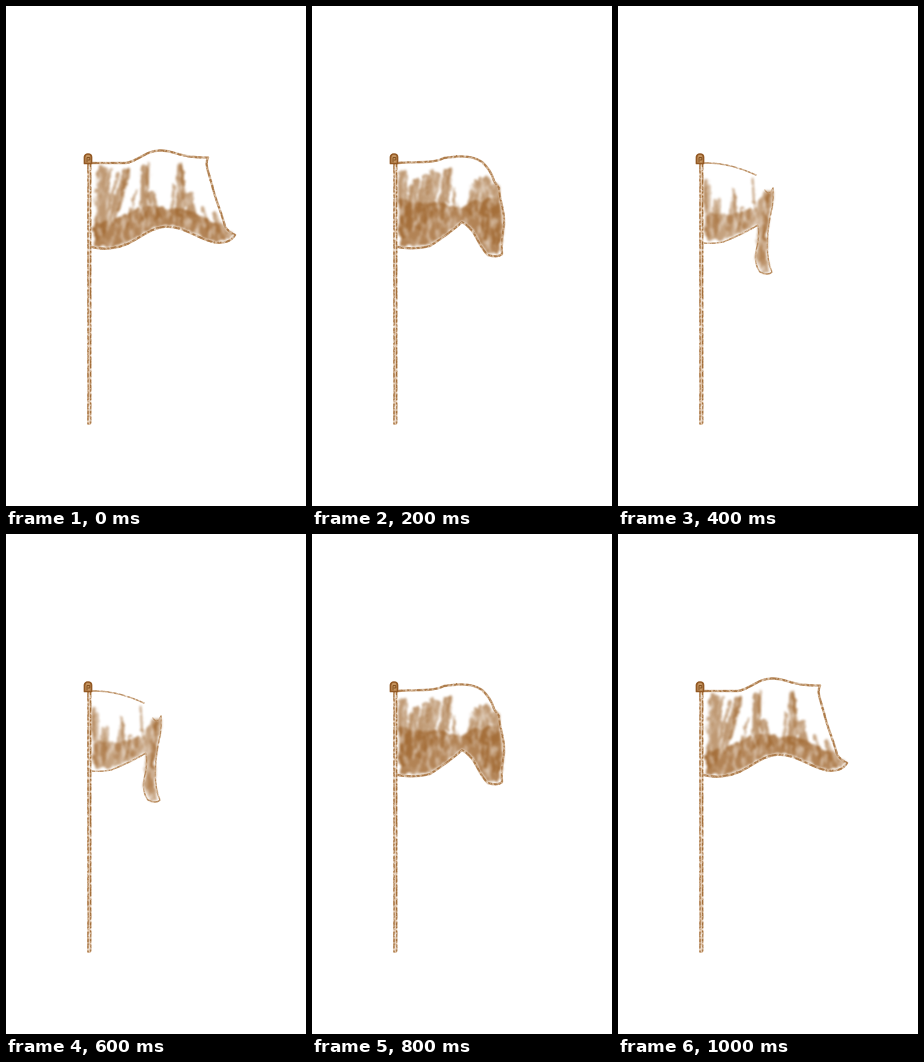
Animation, 300 px wide and 500 px high, one loop 1100 ms. Source, as an HTML page:

```html
<!DOCTYPE html>
<html lang="en">
<head>
<meta charset="utf-8">
<title>Waving flag</title>
<style>
  html, body { margin: 0; width: 100%; height: 100%; overflow: hidden; background: #fff; }
  svg { display: block; width: 100vw; height: 100vh; }
  path { fill: none; stroke-linecap: round; stroke-linejoin: round; }
  .hem { fill: #9f642b; opacity: .8; }
  .wide { stroke: #9f642b; stroke-width: 8; opacity: .66; }
  .thin { stroke: #9f642b; stroke-width: 3; opacity: .6; }
  .base { stroke: #cfac88; stroke-width: 2.5; }
  .grain { stroke: #a06a35; stroke-width: 1.8; stroke-linecap: butt; stroke-dasharray: 7 2 4 2.5 9 2; opacity: .75; }
  .faint .base { stroke-width: 1.5; }
  .faint .grain { stroke-width: 1.2; opacity: .5; }
  .faint .hem { opacity: .6; }
  .faint .wide { stroke-width: 5.5; opacity: .48; }
</style>
</head>
<body>
<svg viewBox="0 0 300 500">
  <defs>
    <filter id="brush" filterUnits="userSpaceOnUse" x="70" y="135" width="175" height="155" color-interpolation-filters="sRGB">
      <feTurbulence type="fractalNoise" baseFrequency=".2 .09" numOctaves="3" seed="4" result="noise"/>
      <feDisplacementMap in="SourceGraphic" in2="noise" scale="6" xChannelSelector="R" yChannelSelector="G" result="rough"/>
      <feColorMatrix in="noise" values="0 0 0 0 0  0 0 0 0 0  0 0 0 0 0  1.4 0 0 0 .22" result="mask"/>
      <feComposite in="rough" in2="mask" operator="in"/>
      <feGaussianBlur stdDeviation="1"/>
    </filter>
    <filter id="pencil" filterUnits="userSpaceOnUse" x="70" y="135" width="175" height="295" color-interpolation-filters="sRGB">
      <feTurbulence type="fractalNoise" baseFrequency=".35" numOctaves="2" seed="9" result="noise"/>
      <feDisplacementMap in="SourceGraphic" in2="noise" scale="1.4" xChannelSelector="R" yChannelSelector="G" result="rough"/>
      <feColorMatrix in="noise" values="0 0 0 0 0  0 0 0 0 0  0 0 0 0 0  1.8 0 0 0 0" result="mask"/>
      <feComposite in="rough" in2="mask" operator="in"/>
      <feGaussianBlur stdDeviation=".3"/>
    </filter>
  </defs>
  <g id="flag"></g>
  <g filter="url(#pencil)">
    <path d="M83.3 159V417" stroke="#e0c3a6" stroke-width="4"/>
    <path d="M82 158V418" stroke="#a06a35" stroke-width="1.3" stroke-dasharray="9 3 5 2"/>
    <path d="M84.7 158V418" stroke="#a06a35" stroke-width="1.3" stroke-dasharray="6 3 11 3"/>
  </g>
  <path d="M78.5 157.5V151Q79 148 82 148Q85.500 148 85.500 151V157.500Z" style="fill:#c4935f" stroke="#925823" stroke-width="1.7"/>
  <path d="M81 156V151.500H83.800V154H82" stroke="#82501f" stroke-width="1"/>
</svg>
<script>
const poses = [
  {
    line: "M86 157L120 157C133 155 140 144 155 144.500C172 145 171 152 202 151.500C198 160 204 168 207 183C212 201 217 210 219 221Q224 227 229 229Q224 238 209 236.500C191 233 181 221 160 220.500C139 222 128 240 108 241.500Q98 244 86 241",
    hem: "M88 219Q112 213 130 204Q142 196 162 203Q182 200 192 209L216 219L227 229Q220 236 207 235C191 231 178 219 160 219C138 221 124 240 105 241L88 240Z",
    wide: "M95 164L92 230M102 166L95 205M101 190L96 228M120 166L106 215M139 163L138 210M146 190L152 212M175 162L174 212M183 190L187 212",
    thin: "M112 167L103 204M123 163L113 203M130 184L122 220M142 157L141 190M176 157L179 200M168 180L165 212M197 202L203 224M209 208L213 224"
  },
  {
    line: "M86 157L119 157.500C133 156 141 144 154 144.500C166 145 169 152 175 155Q183 162 194 166L192 170C197 183 203 194 205 207Q207 224 216 234Q211 241 201 239.500C184 236 180 221 163 220.500C141 223 128 240 112 242Q99 244 86 241",
    hem: "M88 196Q112 204 126 196Q146 190 164 201L184 205L209 219L214 233Q208 239 200 238C184 234 179 219 163 219C140 221 125 240 110 241L88 240Z",
    wide: "M93 165L92 228M103 174L98 225M113 185L109 222M123 176L120 213M136 162L138 208M144 160L150 205M154 172L158 205M170 163L172 210M181 174L184 210",
    thin: "M99 163L95 195M117 166L113 202M131 164L128 200M164 168L165 205M176 167L178 205M186 177L187 212M199 207L204 225"
  },
  {
    line: "M86 157C104 155 121 158 132 152C150 149 162 150 170 156Q179 164 182 175L187 182C187 194 193 204 192 219Q189 234 190 248Q186 252 176 249C165 239 165 224 150 216C139 226 130 232 118 240Q103 244 86 241",
    hem: "M88 192Q110 200 127 196L148 202L160 196L188 190L191 221L188 247Q182 250 176 247C166 237 164 222 150 214C138 224 129 232 116 239L88 240Z",
    wide: "M91 167L91 228M104 176L97 220M114 172L106 220M124 170L116 215M135 166L128 210M164 178L161 207M175 174L173 230M183 181L185 235",
    thin: "M99 180L94 210M120 164L113 202M139 163L136 195M142 183L143 202M158 185L156 205M169 172L169 206"
  },
  {
    faint: true,
    line: "M86 157C105 154 128 157 145 160Q160 166 167 178L171 184C171 200 170 218 171 235Q173 249 171 259Q163 262 157 255C150 240 154 226 144 218C134 229 123 236 112 238Q98 241 86 239",
    hem: "M88 203Q111 208 128 203L148 200L155 185L169 184L169 220L171 257Q163 260 157 253C151 240 154 224 144 216C132 227 120 235 110 237L88 237Z",
    wide: "M91 173L91 228M103 182L98 222M116 179L110 220M129 172L125 212M159 186L160 238M166 188L165 250",
    thin: "M98 181L95 215M120 173L117 209M139 170L138 202M151 178L150 207"
  },
  {
    faint: true,
    line: "M86 157Q110 156 138 169M147 184Q151 191 155 182Q156 197 152 211C149 229 147 251 154 266Q150 270 142 266Q136 258 138 245Q142 231 140 219Q125 228 105 236Q95 238 86 237",
    hem: "M88 207L112 209L138 202L146 186L155 184Q155 200 151 215C148 234 148 251 152 266L144 267Q137 258 139 245L140 218Q121 228 104 234L88 234Z",
    wide: "M90 182L90 229M98 195L97 229M116 192L111 223M131 207L127 220M149 190L145 258",
    thin: "M88 175L88 205M101 192L101 218M116 184L118 215M135 173L137 205M124 202L121 222M151 188L147 235"
  },
  {
    faint: true,
    line: "M86 157Q105 157 126 172M132 188Q138 194 143 186Q144 205 140 223C136 245 137 261 142 276Q137 280 130 276Q124 265 127 248Q131 235 128 223Q115 231 101 235L86 237",
    hem: "M88 210L108 211L126 206L133 191L142 189Q142 211 138 225C135 245 136 261 140 275L132 276Q126 264 128 248L128 222Q113 230 100 234L88 235Z",
    wide: "M90 185L90 230M99 198L97 230M113 195L109 224M136 194L133 267",
    thin: "M88 178L88 205M105 193L104 218M116 185L118 213M124 178L125 206M139 192L135 240"
  }
];
const STEP = 100, LOOP = 1100;

const shape = (name, d) => `<path class="${name}" d="${d}"/>`;
const drawPose = p => `<g class="${p.faint ? "faint" : ""}" display="none">
  <g filter="url(#brush)">${["hem", "wide", "thin"].map(n => shape(n, p[n])).join("")}</g>
  <g filter="url(#pencil)">${shape("base", p.line)}${shape("grain", p.line)}</g></g>`;

const flag = document.getElementById("flag");
flag.innerHTML = poses.map(drawPose).join("");
const groups = [...flag.children];
let shown = -1;

// The flag sinks through all poses, then rises back the same way.
function render(time) {
  const step = Math.floor((time % LOOP) / STEP);
  const pose = Math.min(step, 10 - step);
  if (pose !== shown) {
    groups.forEach((g, i) => g.setAttribute("display", i === pose ? "inline" : "none"));
    shown = pose;
  }
}

function tick(now) {
  render(now);
  requestAnimationFrame(tick);
}
render(0);
requestAnimationFrame(tick);
</script>
</body>
</html>
```
